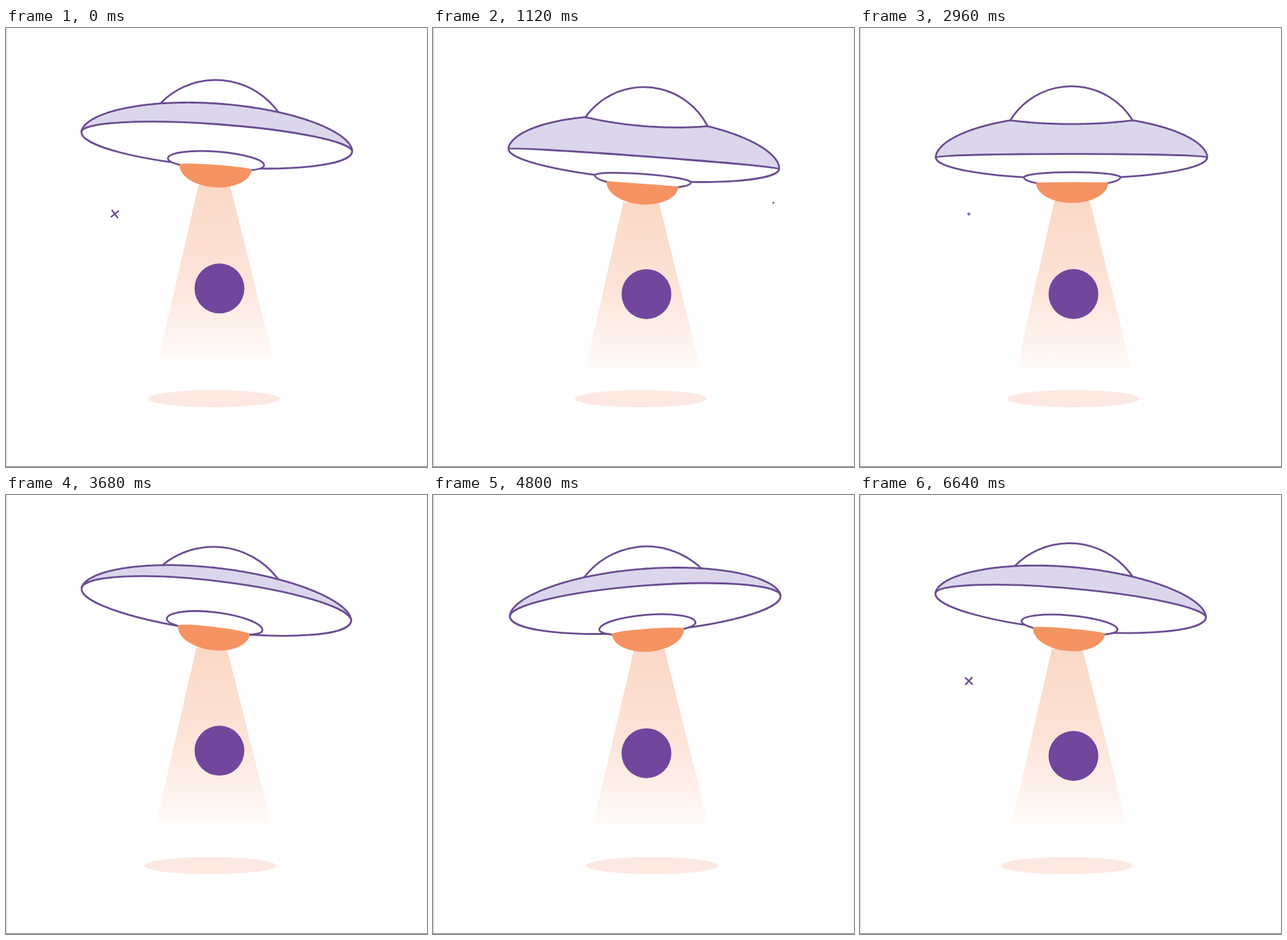
Write an HTML page with a canvas that moves like this. It is 642 by 668 pixels and loops after 6.72 s.

```html
<!DOCTYPE html>
<html lang="en">
<head>
<meta charset="utf-8">
<title>Hovering saucer</title>
<style>
  html, body { margin: 0; width: 100%; height: 100%; overflow: hidden; background: #fefefe; }
  canvas { display: block; }
</style>
</head>
<body>
<canvas id="stage" width="642" height="668"></canvas>
<script>
const ctx = document.getElementById('stage').getContext('2d');
const LOOP = 6720, STEP = 80, HALF = 207, LAG = 80;
const LINE = '#6b4c92', LILAC = '#dcd6ec', ORANGE = '#f69362', PURPLE = '#70479c', WHITE = '#fefefe';

// Times at which each motion turns round, starting from its low end.
const SWAY = [-860, 500, 2200, 3720, 5400, 7220];
const BOB = [-460, 280, 1140, 2000, 2760, 3540, 4260, 5020, 6400, 6720];

const SPARKLE_LIFE = 760;
const SPARKLES = [
  { x: 166, y: 283, start: -440 },
  { x: 519, y: 266, start: 380 },
  { x: 176, y: 63, start: 1640 },
];

const mix = (a, b, k) => a + (b - a) * k;
const ease = x => x < .5 ? 4 * x ** 3 : 1 - 4 * (1 - x) ** 3;

// Eased swing between 0 and 1.
function swing(turns, t) {
  const i = turns.findIndex(turn => turn > t);
  const k = ease((t - turns[i - 1]) / (turns[i] - turns[i - 1]));
  return i % 2 ? k : 1 - k;
}

function paint(fill, stroke) {
  if (fill) { ctx.fillStyle = fill; ctx.fill(); }
  if (stroke) { ctx.strokeStyle = stroke; ctx.stroke(); }
}

// A closed shape made of an upper and a lower half ellipse.
function lens(x, y, rx, up, down, fill, stroke) {
  ctx.beginPath();
  ctx.ellipse(x, y, rx, up, 0, Math.PI, 2 * Math.PI);
  ctx.ellipse(x, y, rx, down, 0, 0, Math.PI);
  ctx.closePath();
  paint(fill, stroke);
}

function drawBeam(x, y, tilt, angle) {
  const drop = y - 169;
  const topX = x + 1 - 69 * Math.sin(angle), topY = y + 66, topHalf = 23.5 + drop * .12;
  const lowX = 326 - .19 * tilt, lowY = 501 + drop * .6, lowHalf = 87.5;
  const glow = ctx.createLinearGradient(0, topY, 0, lowY);
  glow.addColorStop(0, '#fbd8c6');
  glow.addColorStop(.5, '#fde3d8');
  glow.addColorStop(.85, '#fef3ee');
  glow.addColorStop(1, '#fefbfa');
  ctx.beginPath();
  ctx.moveTo(topX - topHalf, topY);
  ctx.lineTo(topX + topHalf, topY);
  ctx.lineTo(lowX + lowHalf, lowY);
  ctx.lineTo(lowX - lowHalf, lowY);
  paint(glow);
}

function drawDome(w, base, top) {
  const h = top - base, r = (w * w + h * h) / (2 * h), a = Math.asin(w / r);
  ctx.beginPath();
  ctx.arc(0, r - top, r, -Math.PI / 2 - a, -Math.PI / 2 + a);
  paint(WHITE, LINE);
}

// The rim's edge sinks in front of the dome when seen from above.
function drawRim(rimAt, domeW, pitch) {
  const base = rimAt(domeW), bulge = Math.min(1, -1.4 + .12 * pitch);
  ctx.beginPath();
  for (let i = 0; i <= 180; i++) {
    const dx = -HALF * Math.cos(i * Math.PI / 180), up = rimAt(dx);
    ctx.lineTo(dx, -(Math.abs(dx) < domeW ? mix(base, up, bulge) : up));
  }
  paint(LILAC, LINE);
}

function drawSaucer(x, y, angle, pitch) {
  const domeW = 94 - .14 * pitch;
  const rimAt = dx => (65 - .26 * pitch) * Math.max(0, 1 - (dx / HALF) ** 2) ** .54;
  ctx.save();
  ctx.translate(x, y);
  ctx.rotate(angle);
  ctx.lineWidth = 2.8;
  ctx.lineJoin = 'round';
  drawDome(domeW, rimAt(domeW), 111.6 - .66 * pitch);
  drawRim(rimAt, domeW, pitch);
  lens(0, 0, HALF, pitch, 31 + .26 * pitch, WHITE, LINE);
  lens(1, 30.5, 73.5, 6 + .36 * pitch, 13, WHITE, LINE);
  lens(1, 38.5, 55, .13 * pitch, 31, ORANGE);
  ctx.restore();
}

function drawSparkle({ x, y, start }, t) {
  const cycle = LOOP / 2;
  const p = (t - start + cycle) % cycle / SPARKLE_LIFE;
  if (p >= 1) return;
  const arm = 8 * Math.sin(Math.PI * p) ** .6;
  ctx.save();
  ctx.translate(x, y);
  ctx.rotate(p * Math.PI / 2);
  ctx.lineWidth = .8 + arm * .2;
  ctx.beginPath();
  ctx.moveTo(-arm, 0);
  ctx.lineTo(arm, 0);
  ctx.moveTo(0, -arm);
  ctx.lineTo(0, arm);
  paint(null, LINE);
  ctx.restore();
}

function draw(t) {
  const tilt = mix(-50, 50, swing(SWAY, t)), angle = Math.asin(tilt / (2 * HALF));
  const x = 322.5 - .035 * tilt, y = mix(199, 166, swing(BOB, t));
  const late = swing(BOB, t - LAG);

  ctx.fillStyle = WHITE;
  ctx.fillRect(0, 0, 642, 668);
  lens(325.5 - .28 * tilt, 564, 100.5, 13, 13, '#fde8e2');
  drawBeam(x, y, tilt, angle);
  lens(325.5, mix(405, 389, late), 38, 38, 38, PURPLE);
  drawSaucer(x, y, angle, mix(1, 36, Math.sqrt(late)));
  SPARKLES.forEach(s => drawSparkle(s, t));
  ctx.fillStyle = '#dcd9dc';
  ctx.fillRect(0, 0, 1.5, 668);
  ctx.fillStyle = '#777276';
  ctx.fillRect(0, 667, 642, 1);
}

const begin = performance.now();
function tick() {
  const t = (performance.now() - begin) % LOOP;
  draw(Math.floor(t / STEP) * STEP);
  requestAnimationFrame(tick);
}
tick();
</script>
</body>
</html>
```
